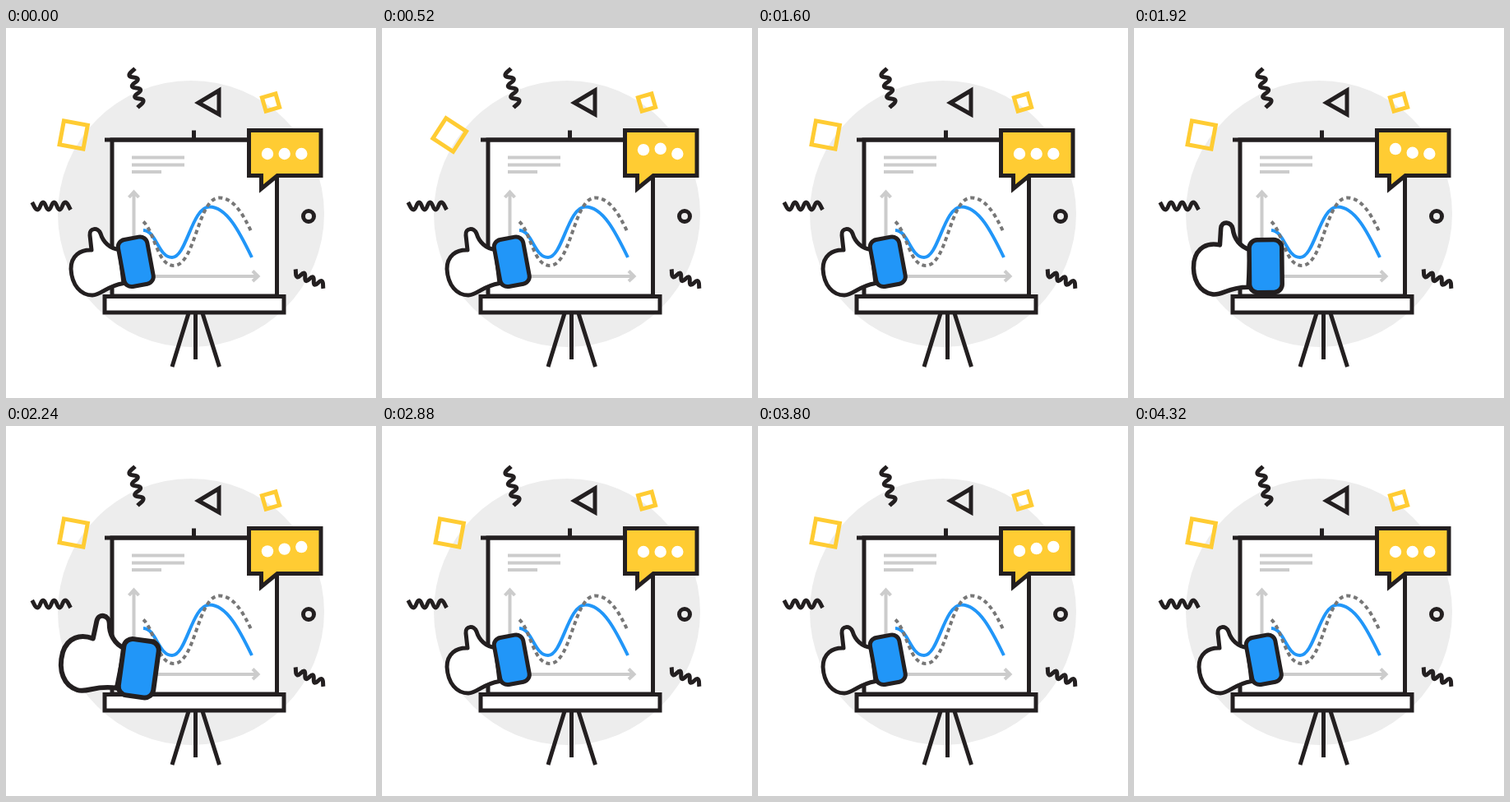
An HTML page for the animation above (4760 ms loop, 450 px wide and 450 px high).

```html
<!DOCTYPE html>
<html lang="en">
<head>
<meta charset="utf-8">
<title>Presentation</title>
<style>
html, body { margin: 0; width: 100%; height: 100%; overflow: hidden; background: #fff; }
svg { display: block; width: 100vw; height: 100vh; }
.ink { fill: none; stroke: #231f20; stroke-width: 5; }
.white { fill: #fff; }
.gold { fill: none; stroke: #fc3; stroke-width: 5; }
.gray { fill: none; stroke: #ccc; stroke-width: 4; }
</style>
</head>
<body>
<svg viewBox="0 0 450 450">
  <defs><path id="wave" class="ink" vector-effect="non-scaling-stroke"/></defs>
  <circle cx="225" cy="226" r="162" fill="#ededed"/>

  <use href="#wave" transform="translate(31.7 216.5)"/>
  <use href="#wave" transform="translate(152.6 50.3) rotate(75.5)"/>
  <use href="#wave" transform="translate(350.6 297) rotate(24) scale(.86)"/>
  <path class="ink" d="M234 91L259 76V105Z"/>
  <circle class="ink" cx="368" cy="229" r="6.5"/>
  <rect id="big" class="gold" x="-14.7" y="-14.7" width="29.4" height="29.4"/>
  <rect id="small" class="gold" x="-8.6" y="-8.6" width="17.2" height="17.2"/>

  <path class="ink" d="M228.5 124.500V136M222 347L202 412M230.5 347V403M239 347L259.500 412"/>
  <path class="ink white" d="M129 136H329.5V326H129Z"/>
  <path class="ink" d="M120 136H338"/>
  <path class="gray" d="M153 157.5H217M153 166.5H217M153 175H189"/>
  <path class="gray" d="M155.5 200V302H306M149.5 206L155.5 199.5L161.5 206M300 295.5L306.5 302L300 308"/>
  <path fill="none" stroke="#2196f8" stroke-width="4"
    d="M167 246C183 246.5 185 279 202 279C219.5 279 226 217.5 247.5 217.5C268.5 217.5 284 248 299 279"/>
  <path fill="none" stroke="#777" stroke-width="4" stroke-dasharray="5 4"
    d="M167 235.5C181 248 184 289 204 289C230.5 289 233 206.5 259.5 206.5C277.5 206.5 289 228 299 249"/>
  <rect class="ink white" x="120" y="326.5" width="218" height="19.5"/>

  <path class="ink" style="fill:#fc3" d="M295.5 124.5H383V179.5H330L310.5 195.5V179.5H295.5Z"/>
  <g fill="#fff">
    <circle class="dot" cx="318" r="7.2"/>
    <circle class="dot" cx="338.7" r="7.2"/>
    <circle class="dot" cx="359.3" r="7.2"/>
  </g>

  <g id="hand">
    <path class="ink white" stroke-linejoin="round"
      d="M138 269.5C126 268.5 118 260 115 250C112 242 101 243 102 252L104 270C90 269.5 79 277 79 293C80 313 91 325 105 325C116 325 121 314 143 310.5Z"/>
    <rect class="ink" style="fill:#2196f8" x="-18" y="-29" width="36" height="58" rx="9"
      transform="translate(157.8 284.3) rotate(-10.5)"/>
  </g>
</svg>
<script>
const LOOP = 4760;
const $ = id => document.getElementById(id);
const dots = document.querySelectorAll('.dot');
const hops = [245, 1725, 3312];

// Zigzag with rounded turns and straight ends
const turns = 7, step = 6.7;
let d = 'M0-4.5';
for (let i = 0; i < turns; i++) {
  const dy = i % 2 ? -9 : 9;
  const first = i === 0 ? dy * 0.6 : 0;
  const last = i === turns - 1 ? dy * 0.4 : dy;
  d += `c${step / 2} ${first} ${step / 2} ${last} ${step} ${dy}`;
}
$('wave').setAttribute('d', d);

// Smooth progress from 0 to 1 between two times
function ease(t, from, to) {
  const x = Math.min(1, Math.max(0, (t - from) / (to - from)));
  return x * x * (3 - 2 * x);
}

function place(id, x, y, angle) {
  $(id).setAttribute('transform', `translate(${x} ${y}) rotate(${angle})`);
}

// Quick rise, slow fall
const lift = u => 6.3 * (ease(u, 0, 125) - ease(u, 125, 615));

function draw(now) {
  const t = now % LOOP;
  place('big', 82.2, 130, 10.5 + 180 * ease(t, 300, 1300));
  place('small', 322, 90.5, -16 + 180 * ease(t, 2840, 3840));

  dots.forEach((dot, i) => {
    const up = hops.reduce((sum, start) => sum + lift(t - start - 160 * i), 0);
    dot.setAttribute('cy', 153 - up);
  });

  const k = ease(t, 1700, 2160) - ease(t, 2160, 2520);
  $('hand').setAttribute('transform',
    `translate(130 284) rotate(${21 * k}) scale(${1 + 0.217 * k}) translate(-130 -284)`);
  requestAnimationFrame(draw);
}
draw(0);
</script>
</body>
</html>
```
